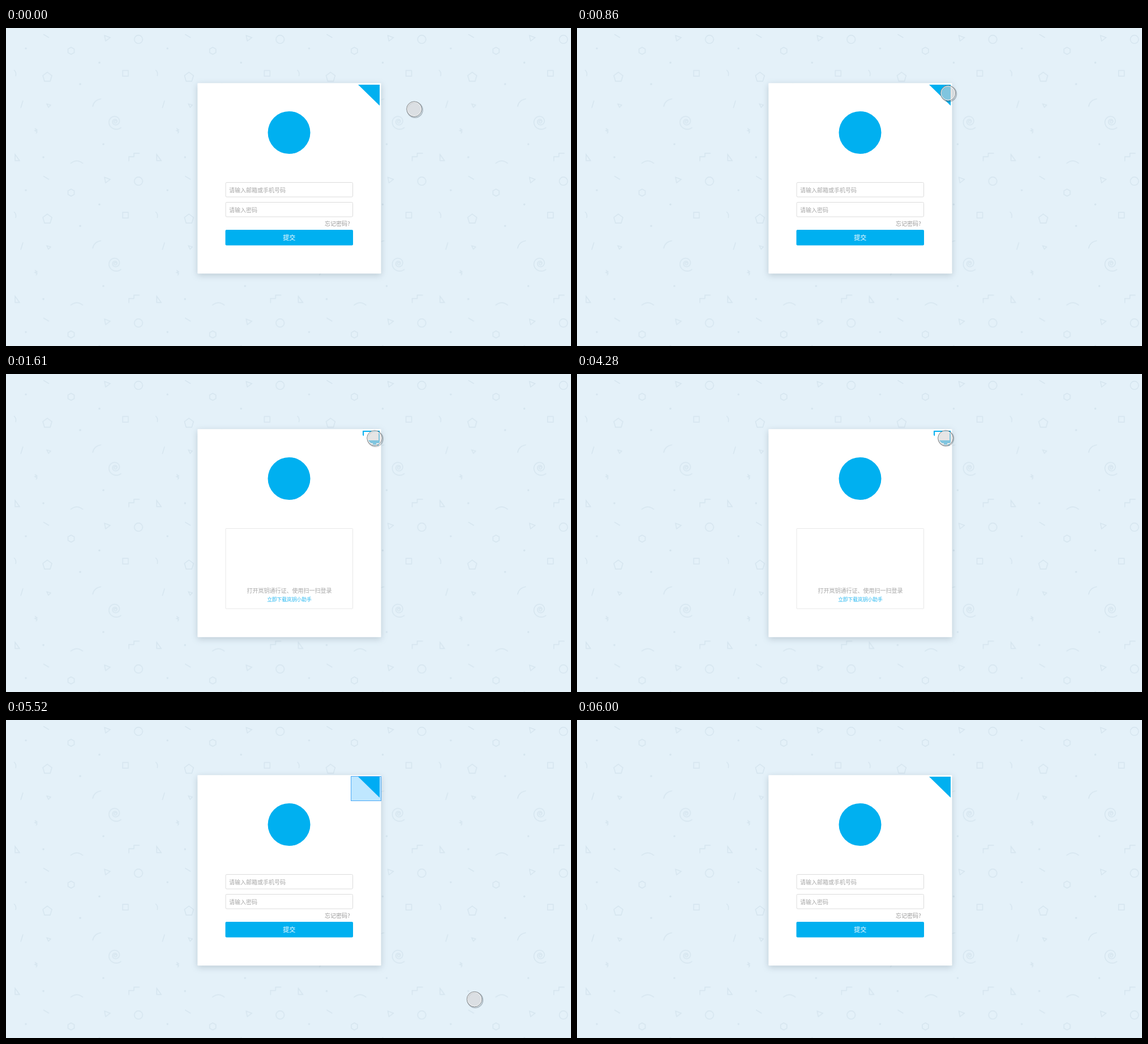
Recreate the animation shown at these times as an HTML page. Size 998x561 px, loop 8000 ms.

```html
<!DOCTYPE html>
<html lang="zh-CN">
<head>
<meta charset="utf-8">
<title>登录</title>
<style>
  html, body { margin: 0; width: 100%; height: 100%; overflow: hidden; background: #e4f1f9; }
  svg { display: block; width: 998px; height: 561px; }
  text { font: 10px "Noto Sans CJK SC", "Noto Sans CJK", sans-serif; fill: #a6a6a6; }
  .box { fill: #fff; stroke: #dcdcdc; }
  .blue { fill: #00b0f0; }
  .mid { text-anchor: middle; }
  #card { fill: #fff; filter: drop-shadow(0 3px 6px rgba(60, 80, 95, .24)); }
</style>
</head>
<body>
<svg viewBox="0 0 998 561">
  <defs>
    <pattern id="doodles" width="250.2" height="250.2" patternUnits="userSpaceOnUse">
      <g fill="none" stroke="#d4e4ee" stroke-width="1.4">
        <path d="M66 11l10 6M174 13l10 4-8 6zM14 74q5 4 3 11M30 128l-4 13M153 139q2-12 15-14M114 239q11-9 22 0"/>
        <path d="M72 134l7 2-4 4zM51 177l4 3-4 1 4 2-2 3M16 223l8 11h-8zM217 235v-8h9v-6h10"/>
        <path d="M115 34l5.500 3v6.500l-5.500 3-5.500-3V37zM73 78l8 6-3 10H68l-3-10z"/>
        <rect x="206" y="75" width="10" height="10"/>
        <circle cx="234" cy="20" r="7.300"/>
        <path id="spiral"/>
      </g>
      <g fill="#d4e4ee">
        <circle cx="35" cy="36" r="1.700"/><circle cx="165" cy="61" r="1.700"/>
        <circle cx="131" cy="99" r="1.700"/><circle cx="172" cy="205" r="1.700"/>
        <circle cx="66" cy="228" r="1.700"/>
      </g>
    </pattern>
    <clipPath id="corner"><path d="M622 100h38v37z"/></clipPath>
  </defs>

  <rect width="998" height="561" fill="#e4f1f9"/>
  <rect width="998" height="561" fill="url(#doodles)"/>
  <rect id="card" x="338.300" y="97.300" width="324.200" height="336" rx="1"/>
  <circle class="blue" cx="500" cy="184.500" r="37.500"/>

  <g id="form">
    <path class="blue" d="M622 100h38v37z"/>
    <rect class="box" x="388" y="272.500" width="224.500" height="25.500" rx="2"/>
    <text x="394" y="289.500">请输入邮箱或手机号码</text>
    <rect class="box" x="388" y="307.500" width="224.500" height="25.500" rx="2"/>
    <text x="394" y="324.500">请输入密码</text>
    <text x="563" y="348.500" style="fill:#999">忘记密码?</text>
    <rect class="blue" x="387.500" y="356" width="225.500" height="27.500" rx="2"/>
    <text class="mid" x="500.300" y="374" style="font-size:11px;font-weight:500;fill:#fff">提交</text>
  </g>

  <g id="scan">
    <g class="blue" clip-path="url(#corner)">
      <path d="M630 100h30v22h-30zM632 102v15h26v-15z" fill-rule="evenodd"/>
      <path d="M648 122h6v2h4v2h-14v-2h4z"/>
    </g>
    <rect class="box" x="388" y="272.500" width="224.500" height="141.500" rx="1" style="stroke:#e8e8e8"/>
    <text class="mid" x="500.500" y="385.500">打开岚钥通行证、使用扫一扫登录</text>
    <text class="mid" x="500.500" y="401.300" style="font-size:8.75px;fill:#22b6f0">立即下载岚钥小助手</text>
  </g>

  <rect id="mark" x="609.500" y="99.500" width="53" height="43" fill="rgba(0,160,255,.25)" stroke="#4aa8f5"/>

  <g id="cursor">
    <circle id="shade" r="13.500" fill="none" stroke="#37474f" stroke-opacity=".3" stroke-width="2"/>
    <circle r="13.300" fill="rgba(214,212,211,.6)" stroke="#7d8184"/>
    <circle r="12.200" fill="none" stroke="#fff" stroke-opacity=".8"/>
  </g>
</svg>
<script>
  const LOOP = 8000;
  const $ = id => document.getElementById(id);
  const clamp = v => Math.min(1, Math.max(0, v));
  const inOut = p => p < .5 ? 4 * p ** 3 : 1 - 4 * (1 - p) ** 3;
  const out = p => 1 - (1 - p) ** 3;
  const mix = (a, b, p) => a.map((v, i) => v + (b[i] - v) * p);
  const show = (id, on) => $(id).style.visibility = on ? 'visible' : 'hidden';

  const START = [721, 143], CORNER = [651, 113], EXIT = [881, 608];

  // Time held at the last step, as in a recording with a low frame rate
  const hold = (t, first, step) => t < first ? 0 : first + Math.floor((t - first) / step) * step;

  function cursorAt(t) {
    if (t < 5360) return mix(START, CORNER, inOut(clamp((hold(t, 60, 100) - 50) / 1080)));
    const s = t < 5580 ? hold(t, 5360, 80) : hold(t, 5580, 80);
    return mix(CORNER, EXIT, out(clamp((s - 5320) / 520)));
  }

  function draw(t) {
    const scanning = t >= 1610 && t < 4550;
    const pressed = (t >= 1400 && t < 1610) || (t >= 4280 && t < 4550);
    show('form', !scanning);
    show('scan', scanning);
    $('card').setAttribute('height', scanning ? 367 : 336);
    $('cursor').setAttribute('transform', `translate(${cursorAt(t)})`);
    show('cursor', t < 6000);
    const d = pressed ? .8 : 1.4;
    $('shade').setAttribute('transform', `translate(${d} ${d})`);
    show('mark', t >= 5360 && t < 6000);
    $('mark').style.opacity = 1 - clamp((hold(t, 5660, 80) - 5660) / 340);
  }

  // Doodle spiral: radius grows exponentially while turning anticlockwise
  const TURN = Math.PI * 5.75;
  const points = Array.from({ length: 80 }, (_, i) => {
    const a = i / 79 * TURN, r = 15 * Math.exp(.13 * (a - TURN));
    return `${(193 + r * Math.cos(a)).toFixed(1)} ${(165 - r * Math.sin(a)).toFixed(1)}`;
  });
  $('spiral').setAttribute('d', 'M' + points.join('L'));

  const begin = performance.now();
  function tick() {
    draw((performance.now() - begin) % LOOP);
    requestAnimationFrame(tick);
  }
  tick();
</script>
</body>
</html>
```
